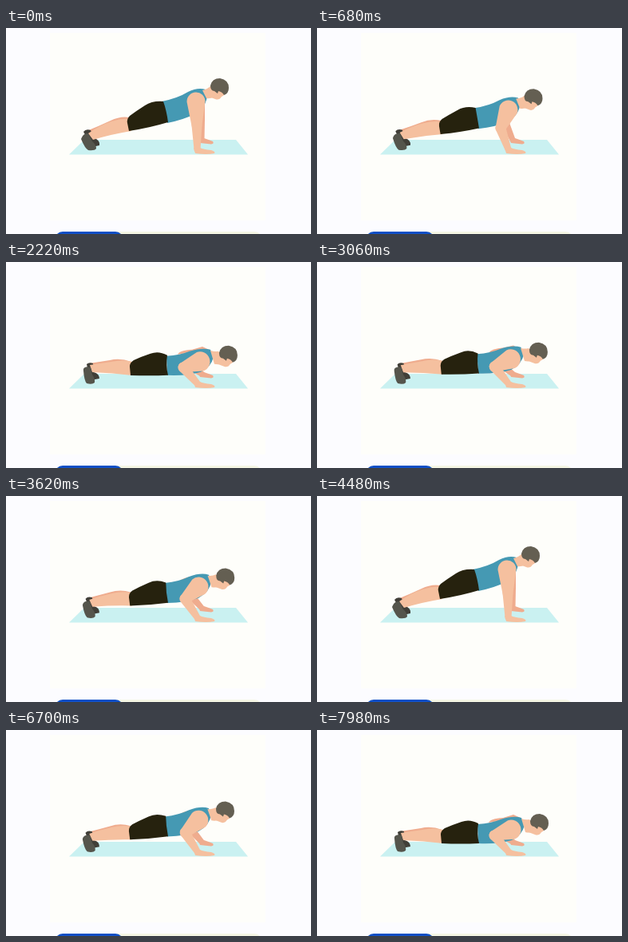
Recreate the animation shown at these times as an HTML page with a canvas. Size 382x258 px, loop 8 s.

```html
<!DOCTYPE html>
<html lang="en">
<head>
<meta charset="utf-8">
<title>Push-up</title>
<style>
html, body { margin: 0; width: 100%; height: 100%; overflow: hidden; background: #fcfcff; }
canvas { display: block; }
</style>
</head>
<body>
<canvas id="stage" width="382" height="258"></canvas>
<script>
const ctx = document.getElementById('stage').getContext('2d');
const LOOP = 8000, START = 320, CYCLE = 5560, HALF = 2080;
const SKIN = '#f5c09f', SHADE = '#efac8e', BLUE = '#4599b3',
      BLACK = '#26220e', HAIR = '#645f52', SHOE = '#55554c', SOLE = '#413f38';
const MAT = 'M98 140H288L303 158.5H79Z';
const FRONT_HAND = 'M235 150L243 150Q247 152 257 153Q263 155 261 157Q252 159 237 157Z';
const BACK_HAND = 'M241 137L248 138Q254 140 259 142Q261 145 257 145.5L243 144Z';
const FACE = 'M258 72L275 78Q275 84 270 86Q267 91 262 89L254 86Z';
const HAIR_CAP = 'M256 72Q258 63 268 63Q279 65 279 75Q279 82 273 84Q271 80 266 79L265 82L261 79Q256 79 256 72Z';

// Each body part: colour, raised outline, lowered outline
const legs = [
  [SHADE, 'M155 112Q143 110 131 116Q116 123 101 129L106 137L155 124Z',
          'M157 125Q143 120 130 123Q117 125 104 127L107 136L157 135Z'],
  [SOLE, 'M97 130Q100 126 106 128L110 138Q118 140 117 147L108 149Z',
         'M101 128Q104 125 109 127L110 138Q117 140 117 146L106 148Z'],
  [SKIN, 'M156 114Q144 113 132 117Q117 122 103 132L109 140Q132 133 157 129Z',
         'M158 125Q145 122 132 125Q118 127 105 129L108 138Q134 139 158 142Z'],
  [SHOE, 'M95 137Q97 132 103 132L108 142Q113 146 113 151Q111 154 103 153Q99 151 94 139Z',
         'M97 134Q99 130 106 132L108 141Q112 146 111 151Q108 154 101 152Q98 149 97 136Z']
];
const trunk = [
  [SHADE, 'M218 91Q228 86 240 82L246 90L222 96Z',
          'M215 116Q217 111 233 110Q246 106 255 110L248 120L222 120Z'],
  [BLUE, 'M195 92Q215 88 228 80Q240 74 250 77L252 83Q252 98 236 108Q222 115 202 119Z',
         'M201 118Q218 117 230 112Q246 107 256 110L260 119Q257 132 244 138Q228 143 202 142Z'],
  [BLACK, 'M197 92Q183 91 174 97Q163 104 155 110Q151 114 152 119L154 129Q180 125 203 118Q201 103 197 92Z',
          'M202 117Q191 111 181 115Q169 119 160 123Q155 126 155 131L156 142Q180 143 203 142Q200 130 202 117Z'],
  [SKIN, 'M246 78Q252 77 257 72L266 82Q260 89 251 88Z',
         'M256 111Q261 113 266 112L276 124Q270 130 261 128Z']
];

const mix = (a, b, p) => a + (b - a) * p;

function fill(color, d) {
  ctx.fillStyle = color;
  ctx.fill(new Path2D(d));
}

function drawParts(parts, p) {
  for (const [color, up, low] of parts) {
    const ends = low.match(/[\d.]+/g);
    let i = 0;
    fill(color, up.replace(/[\d.]+/g, n => mix(+n, +ends[i++], p) + ' '));
  }
}

function limb(color, [ax, ay], [bx, by], ra, rb) {
  const dir = Math.atan2(by - ay, bx - ax), q = Math.PI / 2;
  ctx.fillStyle = color;
  ctx.beginPath();
  ctx.arc(ax, ay, ra, dir + q, dir + 3 * q);
  ctx.arc(bx, by, rb, dir - q, dir + q);
  ctx.fill();
}

function arm(color, shoulder, elbow, wrist, [top, middle, end]) {
  limb(color, shoulder, elbow, top, middle);
  limb(color, elbow, wrist, middle, end);
}

function bar(color, x, y, w, h, r) {
  ctx.fillStyle = color;
  ctx.beginPath();
  ctx.roundRect(x, y, w, h, r);
  ctx.fill();
}

function draw(t) {
  const s = (t - START + CYCLE) % CYCLE;
  const u = Math.min(1, Math.abs(s - HALF) / HALF);
  const p = 1 - u * u;
  // Elbows swing back faster than the body sinks
  const bend = 1 - (1 - p) ** 2;

  ctx.fillStyle = '#fcfcff';
  ctx.fillRect(0, 0, 382, 258);
  bar('#fefefa', 55, 6, 270, 235, 0);
  bar('#f5f6e4', 130, 255, 191, 20, 10);
  bar('#0e4fc6', 61, 255, 86, 20, 10);
  fill('#caf1f1', MAT);

  arm(SHADE, [mix(243, 247, p), mix(90, 118, p)],
    [mix(244, 229, bend), mix(115, 129, p)], [245, 140], [6, 5, 3.5]);
  fill(SHADE, BACK_HAND);
  drawParts(legs, p);
  drawParts(trunk, p);

  ctx.save();
  ctx.translate(11 * p, 42 * p);
  fill(SKIN, FACE);
  fill(HAIR, HAIR_CAP);
  ctx.restore();

  arm(SKIN, [mix(238, 243, p), mix(92, 125, p)],
    [mix(239, 222, bend), mix(122, 132, p)], [239.5, 152], [mix(11.5, 12.5, p), 6.5, 4]);
  fill(SKIN, FRONT_HAND);
}

const begin = performance.now();
function tick() {
  draw((performance.now() - begin) % LOOP);
  requestAnimationFrame(tick);
}
tick();
</script>
</body>
</html>
```
